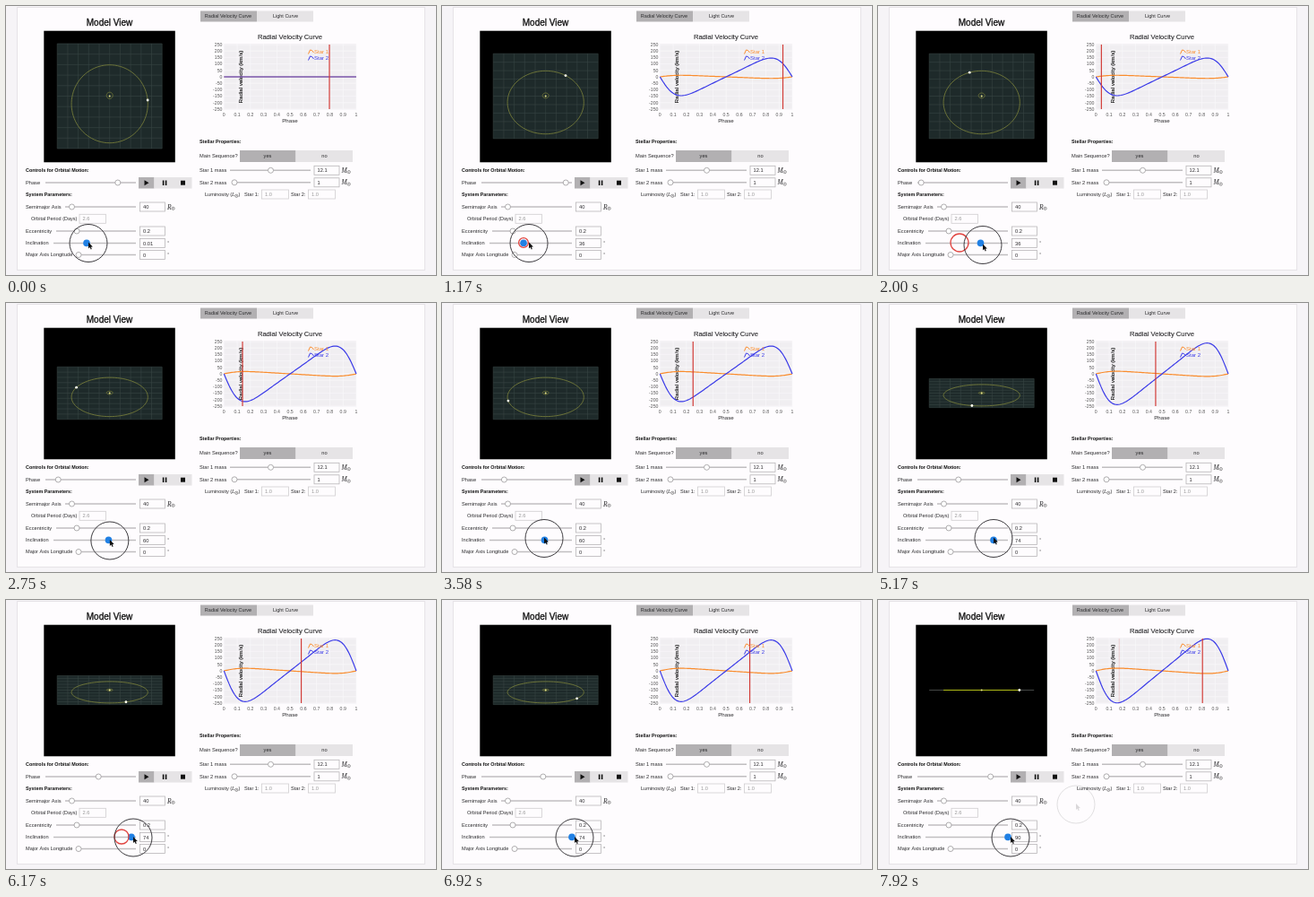
Write an HTML page with a canvas that moves like this. It is 480x300 px and loops after 8 s.

```html
<!DOCTYPE html>
<html lang="en">
<head>
<meta charset="utf-8">
<title>Binary orbit model</title>
<style>
html, body { margin: 0; width: 100%; height: 100%; overflow: hidden; background: #fff; }
canvas { display: block; width: 480px; height: 300px; }
</style>
</head>
<body>
<canvas id="stage"></canvas>
<script>
const canvas = document.getElementById('stage');
const ctx = canvas.getContext('2d');
const dpr = window.devicePixelRatio || 1;
canvas.width = 480 * dpr;
canvas.height = 300 * dpr;

const LOOP = 8000, TAU = Math.PI * 2;
const SANS = '"Liberation Sans", Arial, sans-serif';
const SERIF = '"Liberation Serif", "DejaVu Sans", serif';
const ECC = 0.2, SEMI = 43.5, MASS_RATIO = 12.1, SPEED = 229;
const ORANGE = '#fa8c2c', BLUE = '#3a3ae8', RED = '#d23c38';

// Keys are [time, value] pairs
const PHASE = [[0, .797], [1170, .929], [2000, 1.041], [3580, 1.25], [5170, 1.451], [6170, 1.584], [8000, 1.815]];
const POINTER_X = [[0, 92], [1020, 92], [1170, 97], [1700, 117], [2600, 117], [3000, 114], [4250, 114], [4650, 129], [5930, 129], [6170, 142], [6450, 148]];
const POINTER_Y = [[0, 264.5], [1170, 264.5], [1600, 266.5], [2600, 266.5], [3000, 262.5], [5930, 262.5], [6170, 265]];
const KNOB = [[0, 90], [1170, 91], [1780, 114.5], [4280, 114.5], [4680, 129], [5950, 129], [6170, 140], [6500, 145]];
const ANGLES = [[0, .01], [400, 36], [2250, 60], [4700, 74], [7000, 90]];
const PRESSES = [[1030, 2500, 91], [4250, 5000, 114.5], [5920, 6670, 129]];

function tween(keys, t) {
  for (let i = 1; i < keys.length; i++) {
    const [t0, a] = keys[i - 1], [t1, b] = keys[i];
    if (t < t1) return a + (b - a) * (t - t0) / (t1 - t0);
  }
  return keys[keys.length - 1][1];
}

const latest = (keys, t) => keys.filter(k => k[0] <= t).pop()[1];

function text(s, x, y, size = 5.7, { color = '#2a2a2c', align = 'left', weight = '', family = SANS, stroke = 0 } = {}) {
  ctx.font = `${weight} ${size}px ${family}`;
  ctx.fillStyle = ctx.strokeStyle = color;
  ctx.textAlign = align;
  ctx.textBaseline = 'alphabetic';
  ctx.fillText(s, x, y + size * .35);
  if (stroke) {
    ctx.lineWidth = stroke;
    ctx.strokeText(s, x, y + size * .35);
  }
}

function box(x0, y0, x1, y1, color) {
  ctx.fillStyle = color;
  ctx.fillRect(x0, y0, x1 - x0, y1 - y0);
}

function line(x0, y0, x1, y1, color, width = 1) {
  ctx.strokeStyle = color;
  ctx.lineWidth = width;
  ctx.beginPath();
  ctx.moveTo(x0, y0);
  ctx.lineTo(x1, y1);
  ctx.stroke();
}

function disc(x, y, r, fill, stroke, width = .8) {
  ctx.beginPath();
  ctx.arc(x, y, r, 0, TAU);
  if (fill) { ctx.fillStyle = fill; ctx.fill(); }
  if (stroke) { ctx.strokeStyle = stroke; ctx.lineWidth = width; ctx.stroke(); }
}

function trace(count, point, color, width) {
  ctx.beginPath();
  for (let i = 0; i <= count; i++) ctx.lineTo(...point(i / count));
  ctx.strokeStyle = color;
  ctx.lineWidth = width;
  ctx.stroke();
}

function slider(x0, x1, y, knob) {
  line(x0, y, x1, y, '#c0bec0', 1.5);
  disc(knob, y, 3, '#fff', '#9c9a9c');
}

function field(x0, y, value, muted, x1 = x0 + 28) {
  ctx.strokeStyle = muted ? '#d0ced0' : '#b8b6b8';
  ctx.lineWidth = .8;
  ctx.strokeRect(x0, y - 5, x1 - x0, 10);
  text(value, x0 + 3.5, y + .2, 5.7, { color: muted ? '#999' : '#2a2a2c' });
}

function solarUnit(letter, x, y, size = 7.5) {
  text(letter, x, y, size, { weight: 'italic', family: SERIF });
  const sx = x + ctx.measureText(letter).width + 2;
  disc(sx, y + 1.8, 1.6, null, '#333', .5);
  disc(sx, y + 1.8, .45, '#333');
}

function eccentricAnomaly(phase) {
  const mean = phase * TAU;
  let e = mean;
  for (let i = 0; i < 8; i++) e = mean + ECC * Math.sin(e);
  return e;
}

function drawPage() {
  box(0, 0, 480, 300, '#f6f4f7');
  box(12, 2, 467, 294, '#fefcfe');
  ctx.strokeStyle = '#e6e3e7';
  ctx.lineWidth = 1;
  ctx.strokeRect(12.5, 1.5, 455, 293);
  text('Model View', 115.5, 18.5, 10, { align: 'center', color: '#111', stroke: .3 });
  box(217, 5.5, 280, 17.5, '#b2b0b2');
  box(280, 5.5, 343, 17.5, '#e6e4e6');
  text('Radial Velocity Curve', 248, 11.3, 5.5, { align: 'center' });
  text('Light Curve', 312, 11.3, 5.5, { align: 'center' });
}

function drawModel(phase, angle) {
  const cx = 115.7, cy = 100.5, half = 58.5;
  const tilt = Math.cos(angle * Math.PI / 180);
  const flat = angle === 90;
  const at = (x, y) => [cx + x, cy + y * tilt];
  const orbit = (e, scale) => at(
    -SEMI * Math.sqrt(1 - ECC * ECC) * Math.sin(e) * scale,
    SEMI * (ECC - Math.cos(e)) * scale);

  box(42.3, 27.7, 188.8, 174.3, '#000');
  if (flat) {
    line(cx - half, cy, cx + half, cy, '#565a58', .8);
  } else {
    box(cx - half, cy - half * tilt, cx + half, cy + half * tilt, '#1e2a2a');
    for (let i = -5; i <= 5; i++) {
      const d = i * half / 5;
      line(...at(d, -half), ...at(d, half), '#384644', .6);
      line(...at(-half, d), ...at(half, d), '#384644', .6);
    }
  }
  const color = flat ? '#b0bc18' : '#7e843c';
  trace(90, u => orbit(u * TAU, 1), color, flat ? 1.2 : .8);
  trace(30, u => orbit(u * TAU, -1 / MASS_RATIO), color, .7);
  disc(cx, cy, 1, '#eee98a');
  disc(...orbit(eccentricAnomaly(phase), 1), 1.4, '#fffff0');
}

const plotX = p => 243.3 + p * 147.7;
const plotY = v => 79 - v * .144;

function drawPlot(phase, angle) {
  text('Radial Velocity Curve', 317, 34, 7.6, { align: 'center', stroke: .12 });
  box(243, 42, 391, 115.5, '#f0eef1');
  for (let v = -250; v <= 250; v += 50) {
    line(243, plotY(v), 391, plotY(v), '#faf8fb', .7);
    text(String(v), 241.5, plotY(v), 5.2, { align: 'right', color: '#555' });
  }
  for (let i = 0; i <= 10; i++) {
    const x = plotX(i / 10);
    line(x, 42, x, 115.5, '#faf8fb', .7);
    text(String(i / 10), x, 121, 5.2, { align: 'center', color: '#555' });
  }
  text('Phase', 317, 128, 6.2, { align: 'center' });
  ctx.save();
  ctx.translate(262, 79);
  ctx.rotate(-Math.PI / 2);
  text('Radial velocity (km/s)', 0, 0, 6.2, { align: 'center', color: '#111', stroke: .12 });
  ctx.restore();

  const k = SPEED * Math.sin(angle * Math.PI / 180);
  const curve = scale => p => {
    const e = eccentricAnomaly(p);
    return [plotX(p), plotY(-k * scale * Math.sin(e) / (1 - ECC * Math.cos(e)) ** 2)];
  };
  trace(100, curve(-1 / MASS_RATIO), ORANGE, 1.2);
  trace(100, curve(1), BLUE, 1.2);
  line(plotX(phase), 43, plotX(phase), 115, RED, 1.2);

  [['Star 1', 51, ORANGE], ['Star 2', 58, BLUE]].forEach(([label, y, color]) => {
    trace(3, u => [337.5 + u * 6, y + [2.5, -2, -1.5, 1][Math.round(u * 3)]], color, 1);
    text(label, 344, y, 6, { color });
  });
}

function drawControls(phase, angle) {
  const bold = { weight: 'bold', color: '#111' };
  text('Controls for Orbital Motion:', 22, 183, 5.4, bold);
  text('Phase', 22, 197);
  slider(44, 145, 197, 44 + phase * 101.4);
  box(148, 191, 165.5, 203.5, '#b2b0b2');
  box(165.5, 191, 207.5, 203.5, '#e6e4e6');
  ctx.fillStyle = '#111';
  ctx.beginPath();
  ctx.moveTo(154.5, 194.2);
  ctx.lineTo(159.5, 197.2);
  ctx.lineTo(154.5, 200.2);
  ctx.fill();
  box(174.8, 194.5, 176.4, 200, '#111');
  box(177.8, 194.5, 179.4, 200, '#111');
  box(195, 194.7, 200, 199.7, '#111');

  text('System Parameters:', 22, 210.5, 5.4, bold);
  text('Semimajor Axis', 22, 224);
  slider(66, 145, 224, 73.5);
  field(149.5, 224, '40');
  solarUnit('R', 180, 224);
  text('Orbital Period (Days)', 28, 237.3, 5.5);
  field(82, 237.3, '2.6', true, 111.5);
  text('Eccentricity', 22, 251);
  slider(56, 145, 251, 79);
  field(149.5, 251, '0.2');
  text('Inclination', 22, 264.4);
  line(53, 264.4, 145, 264.4, '#c0bec0', 1.5);
  field(149.5, 264.4, String(angle));
  text('°', 180, 264.4);
  text('Major Axis Longitude', 22, 277.5, 5.6);
  slider(81, 145, 277.5, 81);
  field(149.5, 277.5, '0');
  text('°', 180, 277.5);

  text('Stellar Properties:', 216, 151, 5.4, bold);
  text('Main Sequence?', 216, 167);
  box(261, 161, 323.5, 174, '#b2b0b2');
  box(323.5, 161, 387, 174, '#e6e4e6');
  text('yes', 292, 167, 5.7, { align: 'center' });
  text('no', 355.5, 167, 5.7, { align: 'center' });
  text('Star 1 mass', 216, 183.3);
  slider(250, 340, 183.3, 295.5);
  field(344, 183.3, '12.1');
  solarUnit('M', 374.5, 183.3);
  text('Star 2 mass', 216, 196.8);
  slider(255, 340, 196.8, 255);
  field(344, 196.8, '1');
  solarUnit('M', 374.5, 196.8);
  text('Luminosity (', 222, 210, 5.6);
  solarUnit('L', 252, 210, 6);
  text(')', 259.5, 210, 5.6);
  text('Star 1:', 266, 210, 5.6);
  field(285.5, 210, '1.0', true, 315.5);
  text('Star 2:', 318, 210, 5.6);
  field(337.5, 210, '1.0', true, 367.5);
}

function drawPointer(x, y) {
  disc(x, y, 21, null, '#3c3a3e', 1);
  ctx.beginPath();
  [[0, -1], [0, 6], [1.6, 4.6], [2.7, 7], [3.8, 6.5], [2.8, 4.3], [4.8, 4.1]]
    .forEach(([dx, dy]) => ctx.lineTo(x + dx, y + dy));
  ctx.closePath();
  ctx.fillStyle = '#111';
  ctx.fill();
}

function draw(t) {
  const phase = tween(PHASE, t) % 1;
  const angle = latest(ANGLES, t);
  ctx.setTransform(dpr, 0, 0, dpr, 0, 0);
  drawPage();
  drawModel(phase, angle);
  drawPlot(phase, angle);
  drawControls(phase, angle);
  disc(tween(KNOB, t), 264.4, 3.8, '#2080e4');

  for (const [start, end, x] of PRESSES) {
    if (t >= start && t < end) {
      disc(x, 264, Math.min(10, 2 + (t - start) * .024), null, '#e04440', 1.3);
    }
  }
  drawPointer(tween(POINTER_X, t), tween(POINTER_Y, t));

  // The next scene starts to fade in at the very end
  if (t > 7800) {
    ctx.globalAlpha = (t - 7800) / 800;
    line(plotX(.176), 43, plotX(.176), 115, RED, 1.2);
    drawPointer(221, 228);
    ctx.globalAlpha = 1;
  }
}

const began = performance.now();
function tick() {
  draw((performance.now() - began) % LOOP);
  requestAnimationFrame(tick);
}
tick();
</script>
</body>
</html>
```
